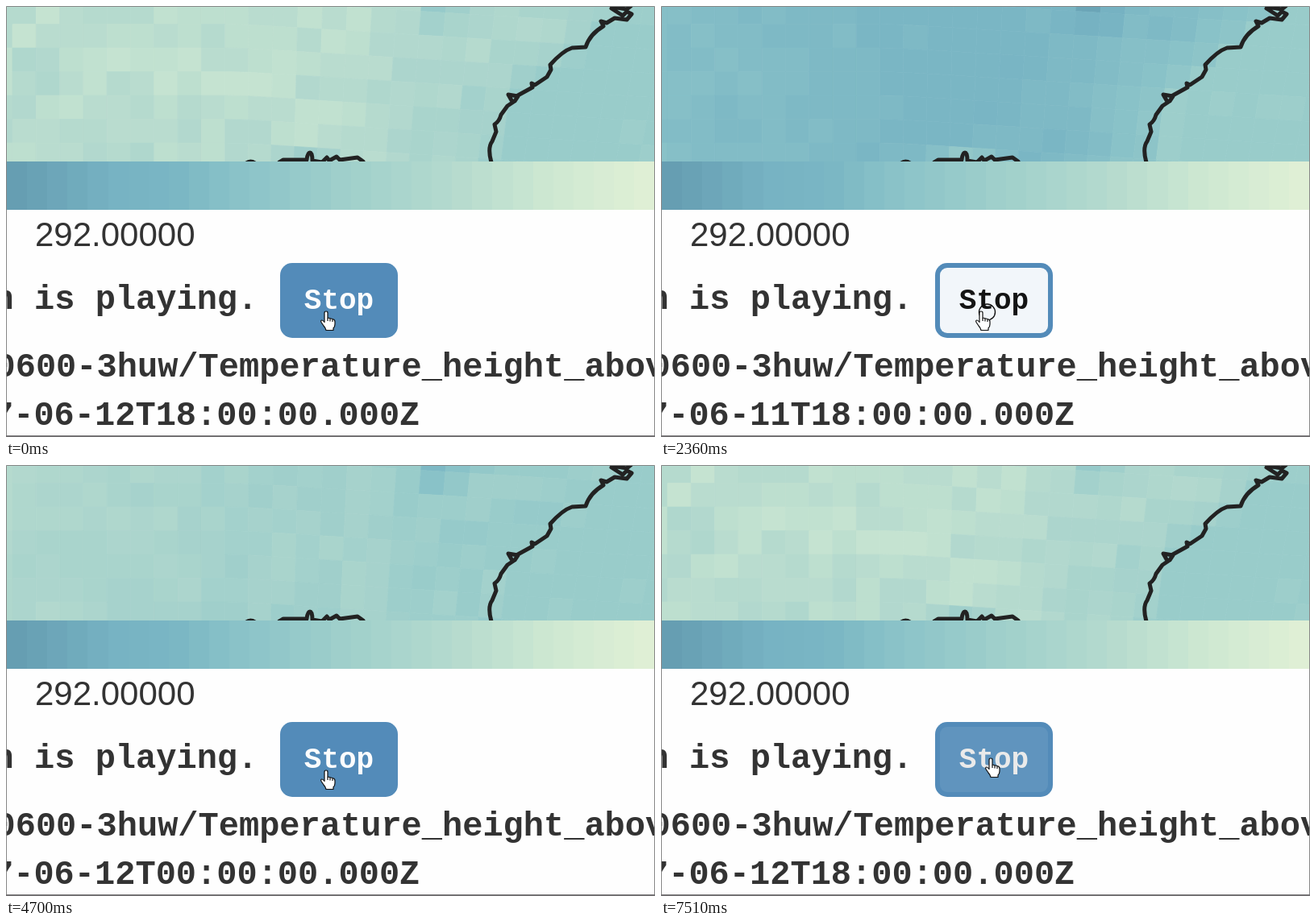
An HTML page that plays this animation: 805x535 px, repeating every 8000 ms.

```html
<!DOCTYPE html>
<html lang="en">
<head>
<meta charset="utf-8">
<title>Temperature map player</title>
<style>
  html, body { margin: 0; width: 100%; height: 100%; overflow: hidden; background: #fefefe; }
  svg { display: block; width: 805px; height: 535px; }
  text { font: bold 42px "Liberation Mono", monospace; fill: #333; white-space: pre; }
  #scale { font: 42px "Liberation Sans", sans-serif; }
  #label { font-size: 36px; text-anchor: middle; }
  #cells polygon { fill: currentColor; stroke: currentColor; stroke-width: .7; }
  #coast { fill: none; stroke: #222; stroke-width: 5; stroke-linejoin: round; stroke-linecap: round; }
</style>
</head>
<body>
<svg viewBox="0 0 805 535">
  <clipPath id="mapArea"><rect x="1" y="1" width="803" height="192"/></clipPath>
  <g clip-path="url(#mapArea)">
    <g id="cells"></g>
    <g id="coast">
      <path d="M602 194 Q597 176 603 168 L608 156 606 147 Q612 143 614 135 L622 124 631 118 635 112 623 110 627 117 M633 112 L653 101 652 96 656 98 671 88 676 79 675 73 Q690 56 702 52 L719 51 Q724 35 741 25 L738 19 745 21 755 15 770 17 776 10 770 7 765 12 751 3 757 2 770 4 775 0"/>
      <path d="M298 195 Q303 191 309 195 M339 194 L344 191 373 191 Q374 182 377 182 Q380 182 380 192 L392 194 398 188 401 192 410 187 414 191 436 188 443 193"/>
    </g>
  </g>
  <g id="bar" shape-rendering="crispEdges"></g>
  <text id="scale" x="36" y="298">292.00000</text>
  <text id="status" y="376"></text>
  <text x="-13.5" y="460">0600-3huw/Temperature_height_above</text>
  <text id="date" x="-16" y="520"></text>
  <rect id="ring" fill="#fefefe" stroke="#7b9ff5" stroke-width="3" rx="2"/>
  <rect id="frame" fill="#538bb9"/>
  <rect id="face" rx="9"/>
  <text id="label" x="413" y="376"></text>
  <circle id="click" cx="404.5" cy="380" r="10" fill="none" stroke="#111" stroke-width="1.4"/>
  <g id="hand" stroke="#111" stroke-width="1.2" stroke-linejoin="round">
    <path fill="#fff" d="M-2 2 Q-2 0 0 0 Q2 0 2 2 V8 L8 9.5 Q11 10 11 13 V16 Q11 19 9 21 V23.5 H0 Q-1 20 -3 18 L-6 13.5 Q-7 11 -5 11 Q-4 11 -2 13.5 Z"/>
    <path fill="none" d="M2 8 V12 M5 9 V12.5 M8 10 V13"/>
  </g>
  <path d="M.5 534 V.5 H804.5 V534" fill="none" stroke="#888"/>
  <rect y="533" width="805" height="2" fill="#747274"/>
</svg>
<script>
const $ = id => document.getElementById(id);
const setAttrs = (el, attrs) => { for (const k in attrs) el.setAttribute(k, attrs[k]); return el; };
const add = (parent, tag, attrs) =>
  parent.appendChild(setAttrs(document.createElementNS('http://www.w3.org/2000/svg', tag), attrs));
const mix = (a, b, p) => a + (b - a) * p;
const mixRgb = (a, b, p) => `rgb(${a.map((c, i) => Math.round(mix(c, b[i], p)))})`;
const rgb = hex => [0, 2, 4].map(i => parseInt(hex.slice(i, i + 2), 16));

// Temperature palette: position along the colour bar, colour.
const palette = [[-.1, '4f80a2'], [0, '669eb2'], [.16, '77b3c3'], [.25, '7ab6c4'], [.36, '8bc3c8'],
  [.52, '9fcfcb'], [.7, 'b5dace'], [.86, 'cfe9d2'], [1, 'dfefd5']].map(([at, hex]) => [at, rgb(hex)]);
function colour(value) {
  const v = Math.max(-.1, Math.min(.999, value));
  const i = palette.findIndex(stop => stop[0] > v);
  const [from, a] = palette[i - 1], [to, b] = palette[i];
  return mixRgb(a, b, (v - from) / (to - from));
}

for (let i = 0; i < 32; i++) {
  const x = Math.round(1 + i * 25.1);
  add($('bar'), 'rect', { x, y: 193, width: 804 - x, height: 60, fill: colour(i / 31) });
}

// The projected grid leans and sinks towards the right.
function gridPoint(i, j) {
  const x = 8 + 29.3 * i + Math.max(0, i - 10) * 1.3;
  const bend = Math.max(0, x - 290);
  const y = -7 + 29.5 * j + bend * .06;
  return [x - y * bend * .00035, y];
}

const coastX = y => 601 + 169 * (Math.max(0, 190 - y) / 190) ** 2;
const bump = (distance, radius) => Math.exp(-((distance / radius) ** 2));

const cells = [];
for (let j = -2; j < 7; j++) {
  for (let i = -1; i < 28; i++) {
    const corners = [gridPoint(i, j), gridPoint(i + 1, j), gridPoint(i + 1, j + 1), gridPoint(i, j + 1)];
    const [x, y] = gridPoint(i + .5, j + .5);
    const shape = add($('cells'), 'polygon', { points: corners.join(' ') });
    cells.push({ i, j, x, y, shape });
  }
}

function random(i, j, seed) {
  const n = Math.sin(i * 127.1 + j * 311.7 + seed * 74.7) * 43758.5453;
  return n - Math.floor(n);
}

// Land temperature at the left edge, the middle and the coast, by hours since the 11th.
const land = {
  6: [.34, .25, .28], 12: [.32, .24, .3], 18: [.71, .77, .63], 24: [.65, .55, .49],
  30: [.37, .34, .33], 36: [.37, .34, .3], 42: [.72, .74, .62]
};
const sea = .48;

// Warm land varies more; the sea and the lake shore are mild; one hill is cold.
function temperature({ i, j, x, y }, [left, middle, right]) {
  const grain = .6 * random(i, j, left) + .4 * random(i >> 1, j >> 1, left + 1) - .5;
  const toCoast = coastX(y) - x;
  if (toCoast < 0) return sea + grain * .03;
  const base = x < 400 ? mix(left, middle, x / 400) : mix(middle, right, Math.min(1, (x - 400) / 220));
  const shore = Math.max(.5 * bump(toCoast, 60), .8 * bump(Math.hypot(x - 380, (y - 190) * 2), 40));
  const hill = .28 * bump(Math.hypot(x - 540, y), 26);
  return mix(base, sea, shore) + grain * middle * .22 - hill;
}

function drawMap(hour) {
  for (const cell of cells) {
    cell.shape.style.color = colour(Math.round(temperature(cell, land[hour]) * 40) / 40);
  }
}

// The page rebuilds its controls at these times; the map follows after a short load.
const redraws = [
  { at: -600, hour: 42 }, { at: 400, hour: 6 }, { at: 1440, hour: 12 }, { at: 2360, hour: 18 },
  { at: 2630, hour: 18, stopped: true }, { at: 3180, hour: 18, stopped: true, focused: true },
  { at: 4310, hour: 24 }, { at: 5350, hour: 30 },
  { at: 6300, hour: 36, load: 270 }, { at: 7240, hour: 42, load: 270 }
];
const tickLength = 120;
const ease = x => 1 - (1 - Math.min(1, x) ** 1.4) ** 3;

function stateAt(time) {
  const now = redraws.findLast(r => r.at <= time);
  const loaded = redraws.findLast(r => r.at + (r.load ?? 150) <= time);
  const age = Math.floor((time - now.at) / tickLength) * tickLength;
  return {
    ...now,
    mapHour: loaded.hour,
    fade: ease((age + 30) / 400),
    clicking: time >= 2360 && time < 2510,
    hand: time < 7510 ? [397, 379] : [409, 364]
  };
}

const placeBox = (el, x, y, right, bottom) => setAttrs(el, { x, y, width: right - x, height: bottom - y });
const show = (el, visible) => el.setAttribute('visibility', visible ? 'visible' : 'hidden');

function drawControls({ hour, stopped, focused, fade, clicking, hand }) {
  const left = stopped ? 319 : 340, right = stopped ? 507 : 486;
  placeBox($('ring'), left - .5, 319.5, right + .5, 411.5);
  placeBox($('frame'), left, 319, right, 412);
  placeBox($('face'), left + 6, 325, right - 6, 406);
  $('frame').setAttribute('rx', focused ? 10 : 15);
  $('face').setAttribute('fill', mixRgb([255, 255, 255], [83, 139, 185], fade));
  $('label').style.fill = mixRgb([0, 0, 0], [253, 253, 253], fade);
  $('label').textContent = stopped ? 'Resume' : 'Stop';
  $('status').textContent = stopped ? 'is stopped.' : 'n is playing.';
  $('status').setAttribute('x', stopped ? 12.5 : -15.4);
  const clock = String(hour % 24).padStart(2, '0');
  $('date').textContent = `7-06-${11 + Math.floor(hour / 24)}T${clock}:00:00.000Z`;
  $('hand').setAttribute('transform', `translate(${hand})`);
  show($('ring'), focused);
  show($('click'), clicking);
}

let shownMap;
function tick(now) {
  const state = stateAt(now % 8000);
  if (state.mapHour !== shownMap) drawMap(shownMap = state.mapHour);
  drawControls(state);
  requestAnimationFrame(tick);
}
tick(0);
</script>
</body>
</html>
```
